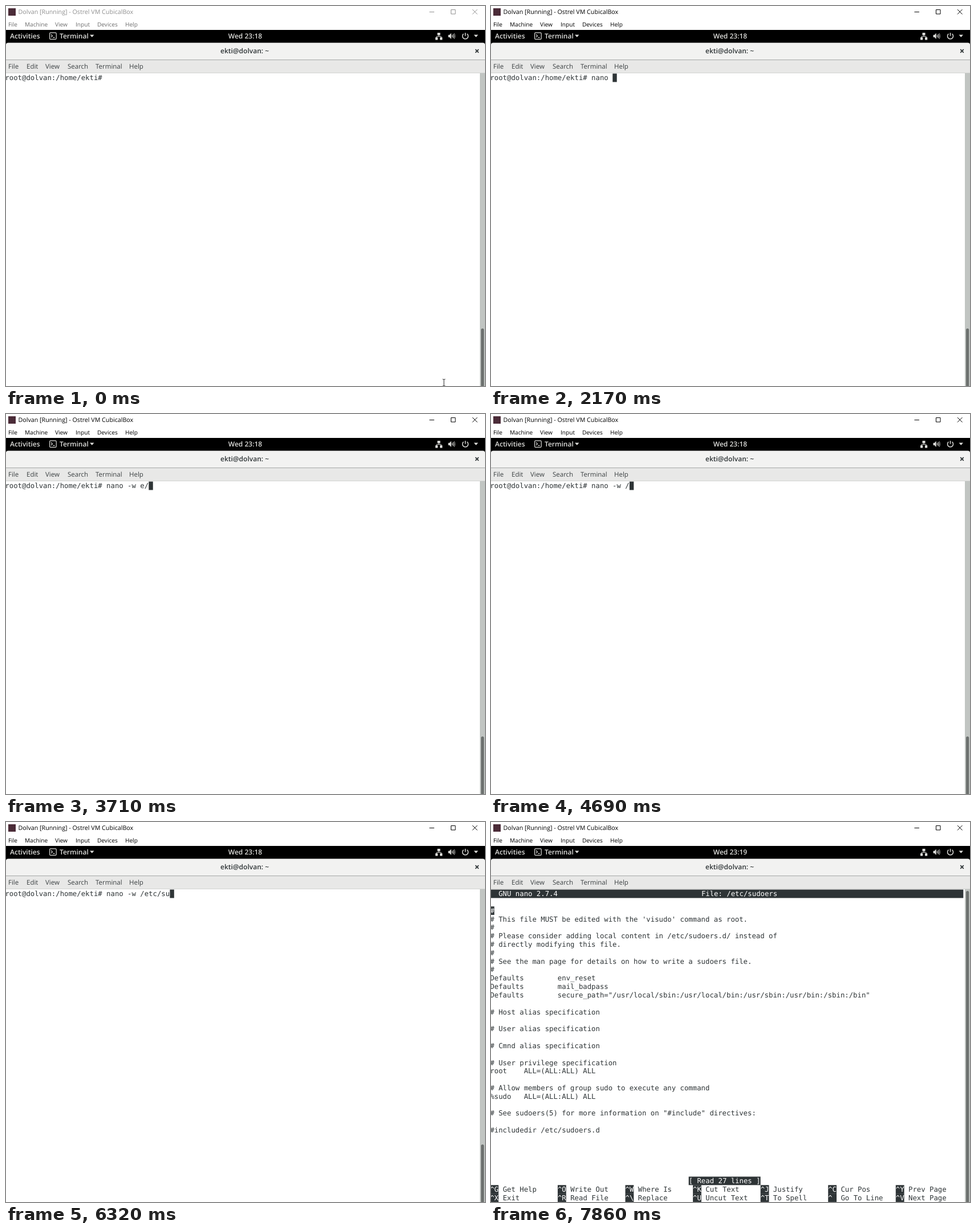
Recreate the animation shown at these times as an HTML page. Size 840 by 667 pixels, loop 8 s.

```html
<!DOCTYPE html>
<html lang="en">
<head>
<meta charset="utf-8">
<title>Terminal session</title>
<style>
  html, body { margin: 0; width: 100%; height: 100%; overflow: hidden; background: #fff; }
  svg { display: block; width: 840px; height: 667px; }
  text { white-space: pre; text-rendering: geometricPrecision; font-family: "Open Sans", "Noto Sans", sans-serif; }
  .title { font-size: 10.7px; }
  .host-menu { font-size: 10.1px; }
  .bar { font-size: 12px; font-weight: 600; }
  .menu { font-size: 11.5px; fill: #3c4143; }
  .mono text { font-family: "DejaVu Sans Mono", monospace; font-size: 12.31px; fill: #2e3436; }
  .mono text.inverse { fill: #fff; }
  .window { --title: #000; --item: #000; }
  .window.inactive { --title: #8f8f8f; --item: #6d6d6d; }
  .title { fill: var(--title); }
  .host-menu { fill: var(--item); }
  .buttons { fill: none; stroke: var(--title); }
</style>
</head>
<body>
<svg viewBox="0 0 840 667">
  <g id="window" class="window">
    <rect width="840" height="42" fill="#fff"/>
    <rect x="4" y="4" width="13" height="13" fill="#4b2c38"/>
    <text class="title" x="21.5" y="14">Dolvan [Running] - Ostrel VM CubicalBox</text>
    <g class="buttons">
      <path d="M742.5 10.5h8.5M780.5 6.5h7.5v7.5h-7.5zM818 6l8.5 8.5M826.5 6l-8.5 8.5"/>
    </g>
    <g id="hostMenu"></g>
  </g>

  <rect y="42" width="840" height="30" fill="#000"/>
  <g fill="#dededb">
    <text class="bar" x="7" y="57">Activities</text>
    <text class="bar" x="94" y="57">Terminal</text>
    <text id="clock" class="bar" x="419.5" y="57" text-anchor="middle"></text>
    <path d="M147 50.5h7.5l-3.75 4.2zM820.5 50.5h7.5l-3.75 4.2z"/>
    <path d="M756.5 47h5v4.2h-5zM753 55h4.2v4.4H753zM761 55h4.2v4.4H761z"/>
    <path d="M775.5 50.8h2.2l3-3.2v10.4l-3-3.2h-2.2z"/>
  </g>
  <g fill="none" stroke="#dededb" stroke-width="1.2">
    <rect x="76.6" y="46.8" width="11.6" height="11.6" rx="1.6"/>
    <path d="M79 50l2.4 2.4-2.4 2.4M82.5 55.3h3"/>
    <path d="M759 51v2.3M755.1 55v-1.7h8V55" stroke-width="1"/>
    <path d="M782.2 50.8q1.2 2 0 4M784 49.3q2.2 3.5 0 7"/>
    <path d="M786 48q2.6 4.8 0 9.6" opacity=".7"/>
    <path d="M802.4 48.9a5 5 0 1 0 6.2 0M805.5 47v5.5" stroke-width="1.5"/>
  </g>

  <path d="M0 95V68q0-3.5 4-3.5h832q4 0 4 3.5v27z" fill="#f2f2f1"/>
  <text class="bar" x="418.5" y="83" text-anchor="middle" fill="#2e3436">ekti@dolvan: ~</text>
  <path d="M823.2 76.2l5.6 5.6M828.8 76.2l-5.6 5.6" stroke="#2e3436" stroke-width="1.7"/>
  <rect y="94" width="840" height="24" fill="#e8e8e7"/>
  <rect y="94" width="840" height="1" fill="#a5a8a6"/>
  <rect y="117" width="840" height="1" fill="#d2d3d1"/>
  <g id="guestMenu"></g>

  <rect y="118" width="840" height="549" fill="#fff"/>
  <g id="shell" class="mono">
    <text id="command"></text>
    <rect id="cursor" fill="#2e3436"/>
  </g>
  <g id="editor" class="mono"></g>
  <rect x="831" y="118" width="9" height="549" fill="#c1c5c2"/>
  <rect id="thumb" x="833" width="5.2" rx="2.6" fill="#6d716f"/>
  <path id="pointer" d="M-2.5-6q2 0 2.5 1q.5-1 2.5-1M0-5V5M-2.5 6q2 0 2.5-1q.5 1 2.5 1" fill="none" stroke="#4a4a4a" stroke-width="1.2"/>
</svg>
<script>
const LOOP = 8000;
const CELL = 7.41, ROW = 14.82, LEFT = -1.6, TOP = 118.6, ASCENT = 11.5;
const PROMPT = 'root@dolvan:/home/ekti# ';
const $ = id => document.getElementById(id);

function add(parent, tag, attrs, content = '') {
  const node = document.createElementNS('http://www.w3.org/2000/svg', tag);
  set(node, attrs);
  node.textContent = content;
  parent.append(node);
  return node;
}
function set(node, attrs) {
  for (const key in attrs) node.setAttribute(key, attrs[key]);
}
const show = (node, visible) => { node.style.display = visible ? '' : 'none'; };
const cellX = col => LEFT + col * CELL;
const rowY = row => TOP + row * ROW;

function menu(parent, className, y, items) {
  for (const [x, label] of items) add(parent, 'text', { class: className, x, y }, label);
}
menu($('hostMenu'), 'host-menu', 36.2,
  [[4, 'File'], [33, 'Machine'], [86, 'View'], [122, 'Input'], [160, 'Devices'], [209, 'Help']]);
menu($('guestMenu'), 'menu', 110.2,
  [[4, 'File'], [36, 'Edit'], [69, 'View'], [108, 'Search'], [157, 'Terminal'], [216, 'Help']]);

// Terminal text on the character grid, optionally inverse over `width` cells.
function print(row, col, content, inverse = false, width = content.length) {
  const editor = $('editor');
  if (inverse) add(editor, 'rect', { x: cellX(col), y: rowY(row), width: width * CELL, height: ROW, fill: '#2e3436' });
  add(editor, 'text', { x: cellX(col), y: rowY(row) + ASCENT, class: inverse ? 'inverse' : '' }, content);
}

const FILE = `
# This file MUST be edited with the 'visudo' command as root.
#
# Please consider adding local content in /etc/sudoers.d/ instead of
# directly modifying this file.
#
# See the man page for details on how to write a sudoers file.
#
Defaults        env_reset
Defaults        mail_badpass
Defaults        secure_path="/usr/local/sbin:/usr/local/bin:/usr/sbin:/usr/bin:/sbin:/bin"

# Host alias specification

# User alias specification

# Cmnd alias specification

# User privilege specification
root    ALL=(ALL:ALL) ALL

# Allow members of group sudo to execute any command
%sudo   ALL=(ALL:ALL) ALL

# See sudoers(5) for more information on "#include" directives:

#includedir /etc/sudoers.d`;
const KEYS = [
  ['^G Get Help', '^O Write Out', '^W Where Is', '^K Cut Text', '^J Justify', '^C Cur Pos', '^Y Prev Page'],
  ['^X Exit', '^R Read File', '^\\ Replace', '^U Uncut Text', '^T To Spell', '^  Go To Line', '^V Next Page']
];
print(0, 0, '  GNU nano 2.7.4', true, 112);
add($('editor'), 'text', { x: cellX(50), y: rowY(0) + ASCENT, class: 'inverse' }, 'File: /etc/sudoers');
print(2, 0, '#', true);
FILE.split('\n').forEach((line, i) => line && print(i + 2, 0, line));
print(34, 47, '[ Read 27 lines ]', true);
KEYS.forEach((keys, i) => keys.forEach((key, j) => {
  print(35 + i, j * 16, key.slice(0, 2), true);
  print(35 + i, j * 16 + 3, key.slice(3));
}));

// [start, state changes]; each step keeps what it does not change.
const STEPS = [
  [0, { typed: '', cursor: false, active: false, pointer: [768, 661], minute: 18, row: 0, nano: false }],
  [100, { pointer: [700, 580] }],
  [210, { pointer: [600, 450], active: true }],
  [310, { pointer: [548, 396] }],
  [540, { cursor: true }],
  [1190, { cursor: false }],
  [1400, { typed: 'n', cursor: true, pointer: null }],
  [1510, { typed: 'nan' }],
  [1620, { typed: 'nano' }],
  [2170, { typed: 'nano ' }],
  [2280, { typed: 'nano -' }],
  [2390, { typed: 'nano -w' }],
  [2610, { typed: 'nano -w ' }],
  [3160, { cursor: false }],
  [3590, { typed: 'nano -w e', cursor: true }],
  [3710, { typed: 'nano -w e/' }],
  [4260, { typed: 'nano -w e' }],
  [4480, { typed: 'nano -w ' }],
  [4690, { typed: 'nano -w /' }],
  [4910, { typed: 'nano -w /e' }],
  [5130, { typed: 'nano -w /et' }],
  [5350, { typed: 'nano -w /etc' }],
  [5460, { typed: 'nano -w /etc/' }],
  [5990, { cursor: false }],
  [6220, { typed: 'nano -w /etc/s', cursor: true }],
  [6320, { typed: 'nano -w /etc/su' }],
  [6540, { typed: 'nano -w /etc/sudo' }],
  [6660, { typed: 'nano -w /etc/sudoer' }],
  [6780, { typed: 'nano -w /etc/sudoers' }],
  [7210, { minute: 19 }],
  [7310, { cursor: false }],
  [7760, { cursor: true, row: 1 }],
  [7860, { nano: true }]
];
let carried = {};
const STATES = STEPS.map(([start, change]) => [start, carried = { ...carried, ...change }]);

set($('command'), { x: LEFT, y: TOP + ASCENT });
set($('cursor'), { width: CELL, height: ROW });

function draw(state) {
  const line = PROMPT + state.typed;
  $('window').classList.toggle('inactive', !state.active);
  $('clock').textContent = 'Wed 23:' + state.minute;
  $('command').textContent = line;
  set($('cursor'), { x: cellX(state.row ? 0 : line.length), y: rowY(state.row) });
  show($('cursor'), state.cursor);
  show($('shell'), !state.nano);
  show($('editor'), state.nano);
  set($('thumb'), { y: state.nano ? 121 : 566, height: 560 });
  show($('pointer'), state.pointer);
  if (state.pointer) set($('pointer'), { transform: `translate(${state.pointer})` });
}

const begin = performance.now();
let shown;
function tick() {
  const time = (performance.now() - begin) % LOOP;
  const state = STATES.findLast(([start]) => start <= time)[1];
  if (state !== shown) draw(shown = state);
  requestAnimationFrame(tick);
}
tick();
</script>
</body>
</html>
```
